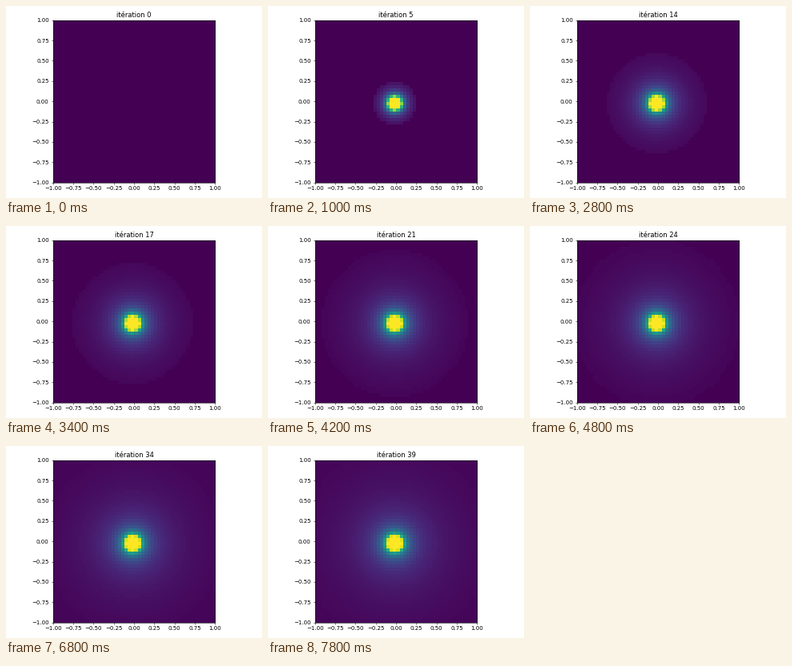
Animation of 320x240 px, one loop 8000 ms. Source, as a matplotlib script:

```python
import math

import matplotlib.pyplot as plt
import numpy as np
from matplotlib.animation import FuncAnimation

W, H, DPI = 320, 240, 50
LEFT, BOTTOM, SIDE = 58.6, 19.4, 202.8
CELLS, CENTER = 50, 24
FRAMES, STEP_MS = 40, 200
STRENGTH, SPEED, CORE = 1.22, 1.4, 1.0

erfc = np.vectorize(math.erfc)
rows, cols = np.indices((CELLS, CELLS)) - CENTER
radius = np.hypot(rows, cols)
steady = STRENGTH / np.maximum(radius - CORE, 0.3)


def field(n):
    """Steady glow behind a soft front that moves out with n."""
    if n == 0:
        return np.zeros((CELLS, CELLS))
    u = steady * erfc(radius / (SPEED * n))
    return np.where(radius < n + 1.5, u, 0)


fig = plt.figure(figsize=(W / DPI, H / DPI), dpi=DPI)
ax = fig.add_axes([LEFT / W, BOTTOM / H, SIDE / W, SIDE / H])
image = ax.imshow(field(0), origin="lower", extent=(-1, 1, -1, 1),
                  cmap="viridis", vmin=0, vmax=1, interpolation="nearest")
ticks = np.linspace(-1, 1, 9)
ax.set_xticks(ticks)
ax.set_yticks(ticks)
title = ax.set_title("itération 0")


def update(n):
    image.set_data(field(n))
    title.set_text(f"itération {n}")
    return image, title


anim = FuncAnimation(fig, update, frames=FRAMES, interval=STEP_MS,
                     repeat=True, repeat_delay=0, blit=False)
plt.show()
```
